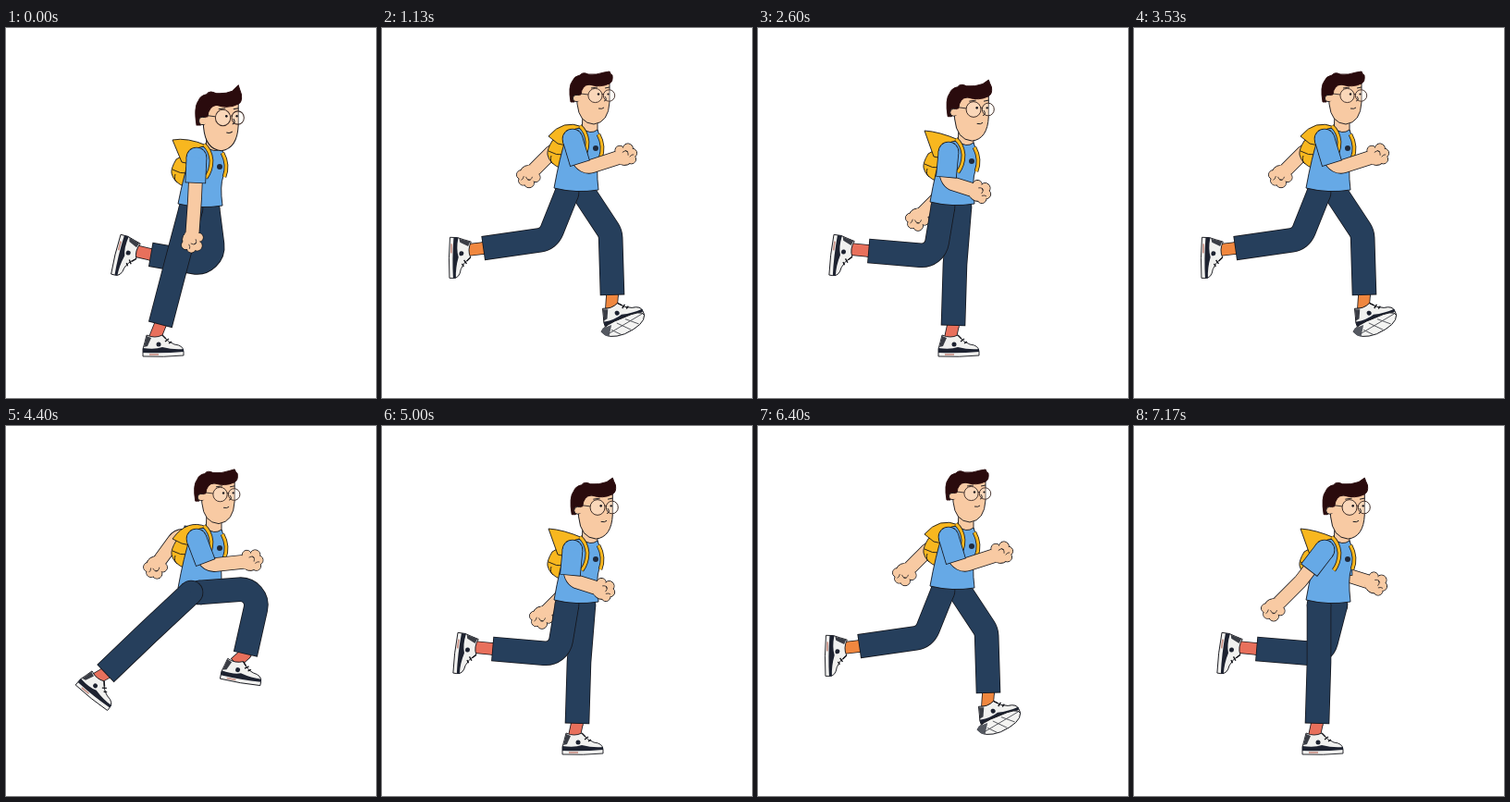
An HTML page with a canvas for the animation above (7.21 s loop, 400 by 400 pixels).

```html
<!DOCTYPE html>
<html lang="en">
<head>
<meta charset="utf-8">
<title>Runner</title>
<style>
html, body { margin: 0; height: 100%; overflow: hidden; background: #fff; }
canvas { display: block; }
</style>
</head>
<body>
<canvas id="stage" width="400" height="400"></canvas>
<script>
const ctx = document.getElementById('stage').getContext('2d');
const INK = '#15161c', SKIN = '#f8caa3', BLUE = '#66a9e6', NAVY = '#263f5c', YELLOW = '#f8b71f';

// Near side, one stride in 12 poses; the far side runs half a stride later.
// Leg: knee x y, hem x y, ankle x y, shoe angle in degrees
const LEG = [
  [184, 255, 167, 320, 161, 335, 0],
  [162, 240, 130, 296, 123, 314, 22],
  [155, 222, 108, 267, 98, 273, 40],
  [158, 226, 107, 254, 92, 259, 68],
  [180, 228, 110, 238, 93, 240, 92],
  [191, 247, 120, 241, 100, 239, 98],
  [213, 257, 144, 245, 127, 241, 105],
  [245, 222, 188, 250, 176, 257, 65],
  [262, 175, 246, 246, 235, 256, 11],
  [255, 196, 246, 268, 241, 280, -6],
  [234, 222, 236, 288, 235, 303, -20],
  [200, 255, 198, 321, 195, 335, 0]
];
// Arm: elbow x y, hand x y
const ARM = [
  [204, 185, 201, 229], [208, 168, 238, 186], [217, 151, 264, 146],
  [217, 152, 265, 141], [216, 153, 262, 138], [203, 166, 238, 177],
  [190, 182, 187, 232], [176, 155, 165, 186], [164, 108, 140, 141],
  [162, 115, 137, 144], [163, 122, 137, 148], [180, 168, 151, 197]
];
// Body bounce, repeated every step
const HEAD_X = [4, 3, 1, 0, 0, 2.5];
const HEAD_Y = [24, 12, 1, -4, 0, 15];
const HEAD_SCALE = [1.15, 1.08, 1.02, 1, 1, 1.1];
const TORSO_Y = [20, 12, 2, -3, 0, 14];
const HEM_Y = [193, 185, 178, 172, 176, 191];
const FLAP_Y = [101, 112, 120, 120, 117, 97];

function shape(d, fill, line = INK, width = 0.9) {
  const path = new Path2D(d);
  if (fill) { ctx.fillStyle = fill; ctx.fill(path); }
  if (line) { ctx.strokeStyle = line; ctx.lineWidth = width; ctx.stroke(path); }
}

function dot(x, y, r, fill, line) {
  ctx.beginPath();
  ctx.arc(x, y, r, 0, 7);
  if (fill) { ctx.fillStyle = fill; ctx.fill(); }
  if (line) { ctx.strokeStyle = line; ctx.lineWidth = 0.9; ctx.stroke(); }
}

// Outlined tube a-b-c, round at a, cut straight at c
function limb(a, b, c, width, color, bend) {
  const len = Math.hypot(c[0] - b[0], c[1] - b[1]) || 1;
  for (const edge of [0.8, 0]) {
    const tone = edge ? INK : color;
    dot(a[0], a[1], width / 2 + edge, tone);
    ctx.beginPath();
    ctx.moveTo(...a);
    ctx.arcTo(...b, ...c, bend);
    ctx.lineTo(c[0] + (c[0] - b[0]) / len * edge, c[1] + (c[1] - b[1]) / len * edge);
    ctx.strokeStyle = tone;
    ctx.lineWidth = width + 2 * edge;
    ctx.stroke();
  }
}

function shoe(x, y, deg) {
  ctx.save();
  ctx.translate(x, y);
  ctx.rotate(deg * Math.PI / 180);
  shape('M-9-3Q0 1 8-3Q14 5 21 7Q31 8 31 15L31 19Q10 21-13 20L-13 12Q-11 5-9-3Z', '#f1f1ef');
  shape('M-13 11Q0 13 8 10Q20 13 31 12L31 15Q10 17-13 16Z', '#1d2230', null);
  shape('M-9-2L-4 0L-8 9L-12 10Z', '#3a3d45', null);
  shape('M8-3L12 1M11 4L15 1M15 6L18 4', null, INK, 1.4);
  shape('M-6 18L4 18', null, '#c98f83', 1.6);
  dot(4, 7, 2.5, '#1d2230');
  if (deg < -15) {
    shape('M-19 20Q-13 14 8 14Q30 12 31 19Q28 29 4 31Q-15 31-19 20Z', '#f4f4f2');
    shape('M-16 17L-6 17L-13 28Q-18 25-19 20Z', '#555961', null);
    shape('M-8 22L0 30M0 17L12 29M10 16L22 26M-13 25L29 17', null, '#44464d', 0.8);
  }
  ctx.restore();
}

function leg(pose, step, far) {
  const [kx, ky, hx, hy, ax, ay, deg] = LEG[pose];
  const dx = far ? 13 : 0;
  const hip = [far ? (step == 2 ? 209 : 218) : 200, HEM_Y[step] + 2];
  const ankle = [ax + dx, ay], hem = [hx + dx, hy];
  const sock = step == 4 ? '#f0873f' : '#e8705c';
  limb(hem, hem, ankle, 12, sock, 0);
  shoe(...ankle, deg);
  limb(hip, [kx + dx, ky], hem, 25, NAVY, 17);
}

function hand(x, y, angle) {
  ctx.save();
  ctx.translate(x, y);
  ctx.rotate(angle);
  const bumps = [[-3, -7, 5], [6, -6, 5.5], [9, 0, 5], [6, 6, 5]];
  for (const b of bumps) dot(...b, SKIN, INK);
  dot(0, 1, 9.5, SKIN, INK);
  for (const [bx, by, r] of bumps) dot(bx, by, r - 0.5, SKIN);
  dot(-3, 0, 8.5, SKIN);
  shape('M3-5Q6-2 4 1M5 3Q8 1 10 2M-1-4Q3-6 5-3', null, INK, 0.7);
  ctx.restore();
}

function arm(pose, step, far) {
  const [ex, ey, hx, hy] = ARM[pose];
  const dx = far ? 22 : 0;
  const dy = far ? (200 - hx) * 0.17 : 0;
  const elbow = [ex + dx, ey + dy], end = [hx + dx, hy + dy];
  const shoulder = [(far ? 225 : 206) - (pose > 6 && pose < 11 ? 6 : 0), 120 + TORSO_Y[step]];
  const angle = Math.atan2(end[1] - elbow[1], end[0] - elbow[0]);
  limb(shoulder, elbow, end, 14, SKIN, 12);
  hand(...end, angle);
  const vx = elbow[0] - shoulder[0], vy = elbow[1] - shoulder[1];
  const k = 27 / Math.hypot(vx, vy);
  const cuff = [shoulder[0] + vx * k, shoulder[1] + vy * k];
  limb(shoulder, shoulder, cuff, 21, BLUE, 0);
}

function backpack(step) {
  ctx.save();
  ctx.translate(0, TORSO_Y[step]);
  shape('M203 111L184 122Q178 132 179 137Q181 147 194 152L203 140Z', YELLOW);
  shape('M180 133Q188 138 198 137M183 138Q181 144 185 147', null);
  shape(`M217 107Q196 98 180 ${FLAP_Y[step]}L190 125Q198 127 211 129Z`, YELLOW);
  ctx.restore();
}

function shirt(step) {
  const y = TORSO_Y[step], hem = HEM_Y[step];
  shape(`M216 ${108 + y}Q204 ${108 + y} 199 ${118 + y}Q192 ${140 + y} 186 ${hem - 3}` +
    `Q210 ${hem + 3} 234 ${hem - 1}Q231 ${150 + y} 235 ${140 + y}Q240 ${126 + y} 233 ${110 + y}` +
    `Q225 ${116 + y} 216 ${108 + y}Z`, BLUE);
  dot(231, 130 + y, 3, '#1f2a3d');
}

function straps(step) {
  ctx.save();
  ctx.translate(0, TORSO_Y[step]);
  for (const d of ['M214 106Q221 112 222 123Q222 134 216 142', 'M234 115Q241 128 236 141']) {
    shape(d, null, INK, 4.6);
    shape(d, null, YELLOW, 3);
  }
  ctx.restore();
}

function neck(step) {
  const top = 92 + HEAD_Y[step], base = 115 + TORSO_Y[step];
  shape(`M217 ${top}L216 ${base}L233 ${base}L233 ${top}Z`, SKIN);
}

function head(step) {
  const s = HEAD_SCALE[step];
  ctx.save();
  ctx.translate(230 + HEAD_X[step], 73 + HEAD_Y[step]);
  ctx.scale((1 + s) / 2, s);
  ctx.translate(-230, -73);
  shape('M210 62L211 82Q213 103 229 104Q245 102 246 80L246 60Z', SKIN);
  const lift = (s - 1) * 30;
  shape(`M204 80Q201 63 206 57Q208 52 214 51Q217 47 223 50Q232 51 240 48L246 ${47 - lift}` +
    `Q247 ${50 - lift} 249 51Q250 58 246 60Q236 65 224 61Q216 62 215 72L209 73L208 80Z`, '#2a0b0d', '#2a0b0d');
  dot(210, 76, 3.6, SKIN, INK);
  dot(212, 76, 3, SKIN);
  shape('M215 71L223 72M238 72Q239 70 240 72', null, INK, 0.8);
  dot(230.5, 73, 7.6, '#fff4e655', '#3b2a25');
  dot(245.5, 73, 6.2, '#fff4e655', '#3b2a25');
  dot(234, 71.5, 1.2, INK);
  dot(244.5, 71.5, 1.1, INK);
  shape('M226 65L233 64M241 65L246 64M241 74Q244 78 240 79M234 87Q238 88 240 86', null, INK, 0.9);
  ctx.restore();
}

function draw(pose) {
  const step = pose % 6, other = (pose + 6) % 12;
  ctx.fillStyle = '#fff';
  ctx.fillRect(0, 0, 400, 400);
  const legs = () => { leg(other, step, true); leg(pose, step, false); };
  arm(other, step, true);
  backpack(step);
  neck(step);
  // A raised thigh covers the hem; otherwise the shirt hangs over the trousers
  if (step == 2) { shirt(step); legs(); } else { legs(); shirt(step); }
  straps(step);
  head(step);
  arm(pose, step, false);
}

// Five drawings per 200 ms, the first held longest
function poseAt(time) {
  const t = time % 7210;
  const block = Math.min(35, Math.floor(t / 200));
  const rest = t - block * 200;
  return (block * 5 + [70, 100, 130, 170].filter(x => rest >= x).length) % 12;
}

function tick() {
  draw(poseAt(performance.now()));
  requestAnimationFrame(tick);
}
tick();
</script>
</body>
</html>
```
